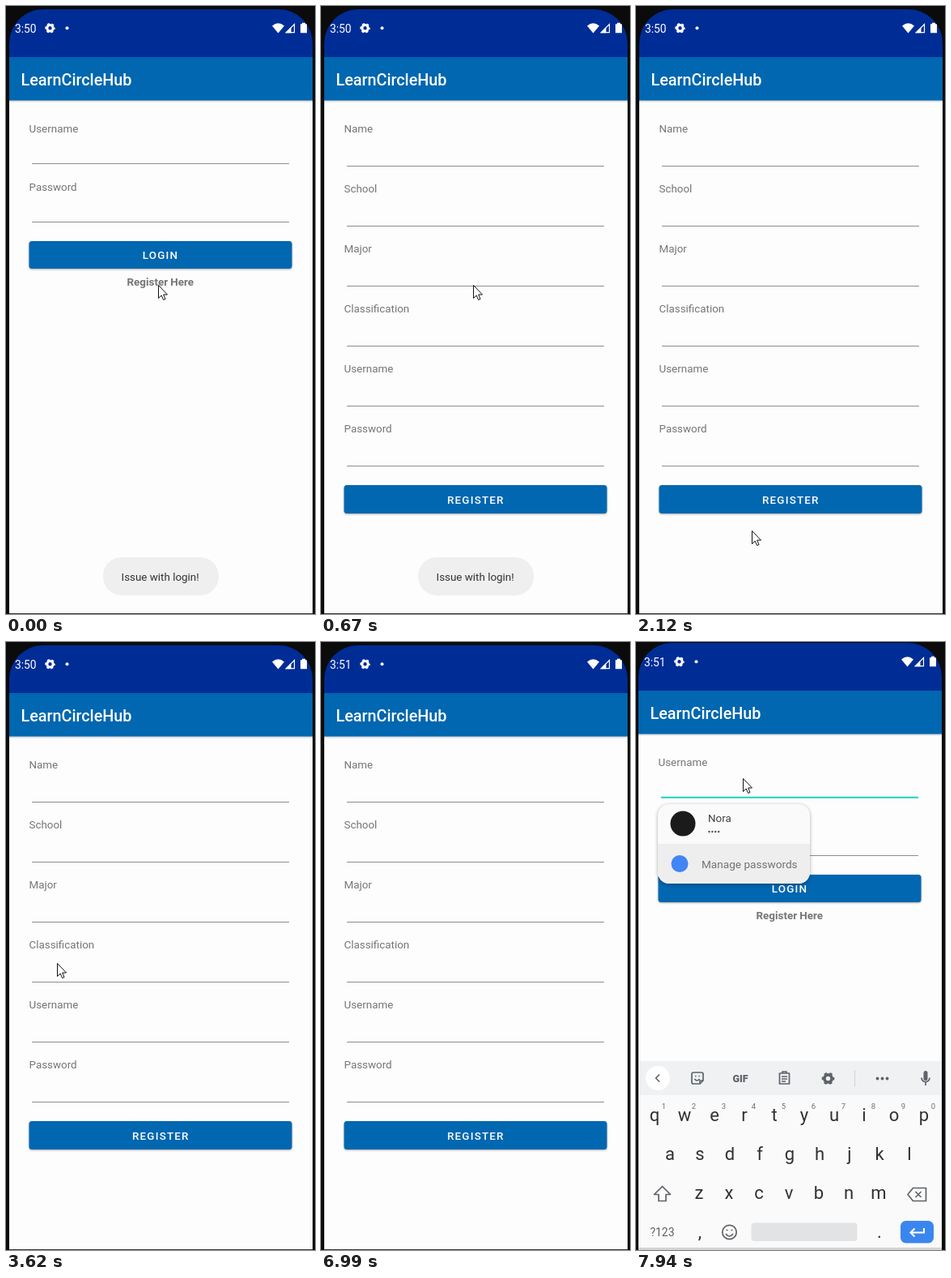
Write an HTML page that moves like this. It is 382 px wide and 750 px high and loops after 8 s.

```html
<!DOCTYPE html>
<html lang="en">
<head>
<meta charset="utf-8">
<title>Login and register</title>
<style>
html, body { margin: 0; width: 100%; height: 100%; overflow: hidden; background: #0b0b0c; }
svg { display: block; width: 100vw; height: 100vh; font: 13.4px Roboto, sans-serif; }

.label { fill: #757575; }
.line { fill: none; stroke: #8e8e8e; }
.button { fill: #0067b0; filter: drop-shadow(0 1.5px 1px #0005); }
.caps { fill: #fff; font-weight: 500; letter-spacing: 1.2px; }
.mid { text-anchor: middle; }
.letters { font-size: 22px; fill: #303134; }
.hints { font-size: 9.5px; fill: #6b6f73; }
.icons { fill: none; stroke: #5f6368; stroke-width: 1.7; stroke-linejoin: round; }

/* every change is a hard step on one 8 s clock */
.phone, .register, .toast, .before, .after, .early, .late, .keys, .menu, .cursor {
  animation: 8s step-end infinite;
}
.phone { animation-name: shift; }
.register { animation-name: open; transform-origin: 191.5px 376.5px; }
.toast { animation-name: fade; }
.before { animation-name: before; }
.after { animation-name: after; }
.early { animation-name: early; }
.late { animation-name: late; }
.keys { animation-name: keys; }
.menu { animation-name: menu; }
.cursor { animation-name: point; }

@keyframes shift { 0% { transform: none } 95.875%, 100% { transform: translate(-1px, -3px) } }
@keyframes open {
  0% { opacity: 0; transform: scale(.9) }
  5.375% { opacity: .5; transform: scale(.95) }
  6.875% { opacity: 1; transform: scale(.985) }
  8.375% { opacity: 1; transform: none }
  95.875%, 100% { opacity: 0; transform: none }
}
@keyframes fade {
  0% { opacity: 1 } 13% { opacity: .92 } 14.5% { opacity: .68 }
  16.375% { opacity: .38 } 18.25% { opacity: .08 } 19.75%, 100% { opacity: 0 }
}
@keyframes before { 0% { opacity: 1 } 55.75%, 100% { opacity: 0 } }
@keyframes after { 0% { opacity: 0 } 55.75%, 100% { opacity: 1 } }
@keyframes early { 0% { opacity: 1 } 95.875%, 100% { opacity: 0 } }
@keyframes late { 0% { opacity: 0 } 95.875%, 100% { opacity: 1 } }
@keyframes keys {
  0% { transform: translateY(240px) }
  97.75% { transform: translateY(60px) }
  99.25%, 100% { transform: none }
}
@keyframes menu { 0% { opacity: 0 } 99.25%, 100% { opacity: 1 } }
@keyframes point {
  0% { opacity: 1; transform: translate(188px, 344px) }
  11.5% { transform: translate(172px, 405px) }
  13% { transform: translate(118px, 520px) }
  14.5% { transform: translate(81px, 584px) }
  16.375% { transform: translate(85px, 592px) }
  18.25% { transform: translate(112px, 655px) }
  19.75% { transform: translate(152px, 727px) }
  21.25% { transform: translate(178px, 711px) }
  23.125% { transform: translate(170px, 686px) }
  24.625% { transform: translate(158px, 664px) }
  26.5% { transform: translate(143px, 647px) }
  37% { transform: translate(160px, 369px) }
  38.875% { transform: translate(158px, 364px) }
  43.75% { transform: translate(104px, 384px) }
  45.25% { transform: translate(63px, 396px) }
  55.75% { transform: translate(68px, 352px) }
  57.25% { transform: translate(78px, 290px) }
  58.875% { transform: translate(86px, 254px) }
  60.75% { transform: translate(108px, 329px) }
  62.625% { transform: translate(107px, 529px) }
  64.125% { transform: translate(106px, 514px) }
  66% { transform: translate(116px, 625px) }
  67.875% { opacity: 0 }
  78.75% { opacity: 1; transform: translate(246px, 619px) }
  80.25% { transform: translate(229px, 589px) }
  82.125% { transform: translate(246px, 655px) }
  83.625% { transform: translate(256px, 709px) }
  87.375% { opacity: 0 }
  95.875%, 100% { opacity: 1; transform: translate(132px, 168px) }
}
</style>
</head>
<body>
<svg viewBox="0 0 382 750">
  <defs>
    <clipPath id="screen"><rect x="4" y="4" width="375" height="800" rx="42"/></clipPath>
    <g id="gear" fill="none" stroke="currentColor">
      <circle r="3.7" stroke-width="3"/>
      <circle r="5.3" stroke-width="1.9" stroke-dasharray="2.8 2.75" stroke-dashoffset="1.4"/>
    </g>
    <g id="page">
      <path fill="#fdfdfd" d="M4 4h375v760H4z"/>
      <path fill="#002c96" d="M4 4h375v59H4z"/>
      <path fill="#c9ced3" d="M4 116h375v1.7H4z"/>
      <path fill="#eceef0" d="M4 117.7h375v1.3H4z"/>
      <path fill="#0067b0" d="M4 63h375v53.5H4z"/>
      <text x="18.5" y="97.5" fill="#fff" font-size="19.8" font-weight="500">LearnCircleHub</text>
    </g>
  </defs>

  <rect width="382" height="750" fill="#0b0b0c"/>

  <g class="phone"><g clip-path="url(#screen)">
    <g>
      <use href="#page"/>
      <g class="label">
        <text x="28.5" y="156">Username</text>
        <text x="28.5" y="227.5">Password</text>
        <text x="149.5" y="344.5" font-weight="700">Register Here</text>
      </g>
      <path class="line" d="M32 194.5h318M32 266.5h318"/>
      <path class="late" stroke="#1fd0c3" stroke-width="2" d="M32 194.8h318"/>
      <rect class="button" x="28.5" y="290" width="325" height="34" rx="3.5"/>
      <text class="caps" x="168.8" y="312">LOGIN</text>
    </g>

    <g class="register">
      <use href="#page"/>
      <g class="label">
        <text x="28.5" y="156">Name</text>
        <text x="28.5" y="230">School</text>
        <text x="28.5" y="304">Major</text>
        <text x="28.5" y="378">Classification</text>
        <text x="28.5" y="452">Username</text>
        <text x="28.5" y="526">Password</text>
      </g>
      <path class="line" d="M32 197.5h318m-318 74h318m-318 74h318m-318 74h318m-318 74h318m-318 74h318"/>
      <rect class="button" x="28.5" y="591" width="325" height="35" rx="3.5"/>
      <text class="caps" x="156" y="613.7">REGISTER</text>
    </g>

    <g class="toast">
      <rect x="120" y="680" width="143" height="47" rx="23" fill="#efefef"/>
      <text x="142.5" y="709" fill="#333">Issue with login!</text>
    </g>

    <g fill="#fff" color="#fff">
      <g font-size="13.8">
        <text class="before" x="11" y="32.7">3:50</text>
        <text class="after" x="11" y="32.7">3:51</text>
      </g>
      <use href="#gear" x="54.5" y="27.3"/>
      <circle cx="75.5" cy="27.3" r="2"/>
      <path d="M336.5 33.5 329 24.6Q336.5 18 344 24.6zM345 33.2h7.5v-7.5z"/>
      <path d="M346.5 32.6h10V22.5z" fill="none" stroke="#fff" stroke-width="1.2"/>
      <path d="M364 22.3h2v-1.5h4v1.5h2v11h-8z"/>
    </g>
    <path class="early" fill="#3a3a3a" d="M4 749h375v1H4z"/>
  </g></g>

  <g class="late">
    <g class="keys">
      <path fill="#fafafa" d="M3 517h375v230H3z"/>
      <path fill="#eff1f3" d="M3 517h375v42H3z"/>
      <path fill="#d3d4d5" d="M3 747h375v3H3z"/>
      <circle cx="27" cy="538" r="15" fill="#fff"/>
      <g class="icons">
        <path d="M29 533.5l-4.5 4.5 4.5 4.5"/>
        <path d="M71 531h10a2 2 0 0 1 2 2v8l-4 4h-8a2 2 0 0 1-2-2v-10a2 2 0 0 1 2-2zm12 10h-4v4M72.5 539q3 4 6 0M73 535.5h1.5m3 0H79"/>
        <path d="M177.500 532h12v13h-12zM181 532v-2h5v2m-6 4h7m-7 3h7m-7 3h5"/>
        <path stroke="#cfd2d5" stroke-width="1" d="M270.500 528v21"/>
        <path d="M353 537.500a5 5 0 0 0 10 0M358 543v4"/>
      </g>
      <rect x="355.500" y="529" width="5" height="12" rx="2.500" fill="#5f6368"/>
      <g fill="#5f6368">
        <circle cx="298.500" cy="538.500" r="1.900"/>
        <circle cx="304.500" cy="538.500" r="1.900"/>
        <circle cx="310.500" cy="538.500" r="1.900"/>
        <text class="mid" x="129" y="542.500" font-size="12.500" font-weight="900">GIF</text>
      </g>
      <use href="#gear" transform="translate(237.500 538.500) scale(1.250)" color="#5f6368"/>

      <g class="letters mid">
        <text y="591" x="23 60 97 134 171 208 245 282 319 356">qwertyuiop</text>
        <text y="639" x="42 79 116 153 190 227 264 301 338">asdfghjkl</text>
        <text y="687" x="78 115 152 189 226 263 300">zxcvbnm</text>
        <text y="735" x="79 301">,.</text>
      </g>
      <text class="hints mid" y="576" x="34.500 71.500 108.500 145.500 182.500 219.500 256.500 293.500 330.500 367.500">1234567890</text>
      <text class="mid" x="32.500" y="733" fill="#5f6368" font-size="14">?123</text>
      <g class="icons">
        <path d="M32.500 671.500l10 10h-5.500v8h-9v-8h-5.500z"/>
        <path d="M342.500 673.500h16v16h-16l-6.500-8zM345.500 678l7 7m0-7l-7 7"/>
        <circle cx="115.500" cy="728" r="8.700"/>
        <path d="M111 730q4.500 6 9 0M111.500 725.500h2m4 0h2"/>
      </g>
      <rect x="142.500" y="716.500" width="131" height="22.500" rx="4" fill="#e1e3e4"/>
      <rect x="327" y="714" width="41" height="27.500" rx="6.500" fill="#3b86ee"/>
      <path fill="none" stroke="#fff" stroke-width="2" d="M356 723v5.500h-16.500m5-5l-5 5 5 5"/>
    </g>

    <g class="menu">
      <rect x="27" y="200" width="188" height="98" rx="14" fill="#fafafa" style="filter: drop-shadow(0 1px 2px #0005)"/>
      <path fill="#eee" d="M27 249h188v35a14 14 0 0 1-14 14H41a14 14 0 0 1-14-14z"/>
      <circle cx="58" cy="224" r="15.500" fill="#1b1b1b"/>
      <circle cx="54" cy="273.500" r="10.500" fill="#4285f4"/>
      <text x="89" y="222" fill="#3c4043">Nora</text>
      <path fill="none" stroke="#5f6368" stroke-width="2.600" stroke-linecap="round" stroke-dasharray="0 3.900" d="M90.500 234h12"/>
      <text x="81" y="279" fill="#6f7275" font-size="13.600">Manage passwords</text>
    </g>
  </g>

  <path class="cursor" fill="#fff" stroke="#111" d="M.5.5V16.500L4.200 13 6.600 18.500 9 17.500 6.700 12H11.500z"/>
</svg>
</body>
</html>
```
